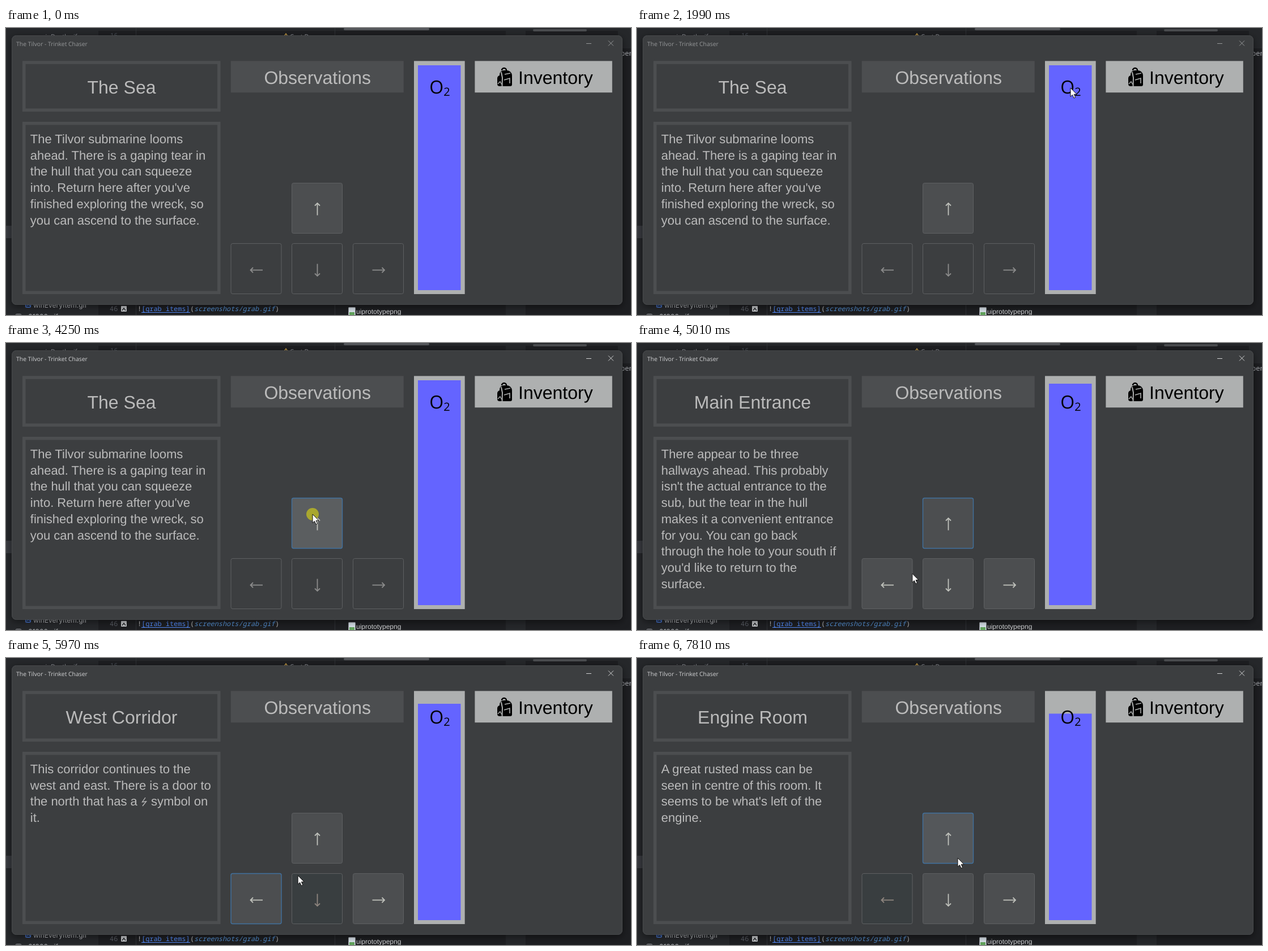
Recreate the animation shown at these times as an HTML page with a canvas. Size 1103 by 508 pixels, loop 8000 ms.

```html
<!DOCTYPE html>
<html lang="en">
<head>
<meta charset="utf-8">
<title>Underwater exploration game</title>
<style>
  html, body { margin: 0; width: 100%; height: 100%; overflow: hidden; background: #1e1f22; }
  canvas { display: block; }
</style>
</head>
<body>
<canvas width="1103" height="508"></canvas>
<script>
const ctx = document.querySelector('canvas').getContext('2d');
ctx.textRendering = 'geometricPrecision';
const LOOP = 8000;
const SANS = '"Liberation Sans", Arial, sans-serif';
const UI = '"Open Sans", sans-serif';
const MONO = '"Noto Sans Mono", monospace';
const PANEL = '#3c3e40', RAISED = '#4c4e50', LIGHT = '#aeb0b0', INK = '#bbbbbb';

const scenes = [
  { at: 0, title: 'The Sea', air: 66, off: 'left down right', lines: [
    'The Tilvor submarine looms', 'ahead. There is a gaping tear in', 'the hull that you can squeeze',
    "into. Return here after you've", 'finished exploring the wreck, so', 'you can ascend to the surface.'] },
  { at: 4410, title: 'Main Entrance', air: 72, off: '', lines: [
    'There appear to be three', 'hallways ahead. This probably', "isn't the actual entrance to the",
    'sub, but the tear in the hull', 'makes it a convenient entrance', 'for you. You can go back',
    'through the hole to your south if', "you'd like to return to the", 'surface.'] },
  { at: 5620, title: 'West Corridor', air: 81, off: 'down', bolt: true, lines: [
    'This corridor continues to the', 'west and east. There is a door to',
    'the north that has a    symbol on', 'it.'] },
  { at: 6670, title: 'Electrical Room', air: 90, off: 'left', lines: [
    'Panels of dead switches line the', 'walls of this room. There are',
    'doors to the north and east.'] },
  { at: 7700, title: 'Engine Room', air: 98.5, off: 'left', lines: [
    'A great rusted mass can be', 'seen in centre of this room. It',
    "seems to be what's left of the", 'engine.'] }
];

const buttons = [
  { name: 'up', x: 504, y: 274, turn: 0 },
  { name: 'left', x: 396.5, y: 381, turn: -1 },
  { name: 'down', x: 504, y: 381, turn: 2 },
  { name: 'right', x: 612, y: 381, turn: 1 }
];

const clicks = [[4060, 4410], [5550, 5700], [7610, 7810]];
const focusChanges = [[4060, 'up'], [5550, 'left'], [6670, 'up']];

// Pointer route: time, x, y
const route = [
  [0, 1070, 508], [70, 1069, 490], [400, 985, 190], [830, 820, 62], [1100, 733, 150],
  [1400, 765, 398], [1650, 855, 304], [1800, 868, 200], [1990, 765, 106], [2330, 765, 106],
  [2580, 560, 4], [2850, 44, 190], [3000, 150, 310], [3170, 92, 150], [3310, 181, 62],
  [3600, 390, 130], [3990, 541, 303], [4600, 541, 303], [5010, 486, 408], [5350, 460, 424],
  [5790, 460, 424], [5970, 515, 385], [6540, 566, 354], [LOOP, 566, 354]
];

function pointerAt(t) {
  const i = Math.max(0, route.findIndex(p => p[0] > t) - 1);
  const a = route[i], b = route[i + 1], span = b[0] - a[0], u = (t - a[0]) / span;
  const still = (p, q) => p[1] === q[1] && p[2] === q[2];
  const slope = (k, axis) => {
    const p = route[k - 1], c = route[k], n = route[k + 1];
    return !p || !n || still(p, c) || still(c, n) ? 0 : (n[axis] - p[axis]) / (n[0] - p[0]);
  };
  const axisAt = axis =>
    (2 * u ** 3 - 3 * u * u + 1) * a[axis] + (3 * u * u - 2 * u ** 3) * b[axis] +
    span * ((u ** 3 - 2 * u * u + u) * slope(i, axis) + (u ** 3 - u * u) * slope(i + 1, axis));
  return { x: axisAt(1), y: axisAt(2) };
}

function rect(x, y, w, h, color) {
  ctx.fillStyle = color;
  ctx.fillRect(x, y, w, h);
}

function rounded(x, y, w, h, r, fill, stroke, width = 1) {
  ctx.beginPath();
  ctx.roundRect(x, y, w, h, r);
  if (fill) { ctx.fillStyle = fill; ctx.fill(); }
  if (stroke) { ctx.strokeStyle = stroke; ctx.lineWidth = width; ctx.stroke(); }
}

function text(str, x, y, font, color, align = 'left') {
  ctx.font = font;
  ctx.fillStyle = color;
  ctx.textAlign = align;
  ctx.fillText(str, x, y);
}

function line(points, color, width = 1) {
  ctx.beginPath();
  points.forEach(([x, y]) => ctx.lineTo(x, y));
  ctx.strokeStyle = color;
  ctx.lineWidth = width;
  ctx.stroke();
}

function frame(x, y, w, h) {
  ctx.strokeStyle = RAISED;
  ctx.lineWidth = 5.5;
  ctx.strokeRect(x + 2.75, y + 2.75, w - 5.5, h - 5.5);
}

function drawEditor() {
  rect(0, 0, 1103, 508, '#1e1f22');
  rect(0, 0, 163, 508, '#26282b');
  rect(0, 350, 12, 22, '#3a3c41');
  rect(882, 0, 35, 508, '#26282b');
  rect(163, 0, 940, 5, '#26282b');
  rect(1080, 5, 23, 31, '#26282b');
  for (const x of [229, 580]) rect(x, 0, 1, 508, '#303236');
  rounded(596, 0, 151, 4, 2, '#55575b');
  rounded(930, 2, 95, 4, 2, '#4b4d50');

  text('winDeath.gif', 61, 19, '11px ' + UI, '#9a9ca1');
  text('16', 184, 17, '11px ' + MONO, '#4b5059');
  text('Cost Down', 501, 19, '11px ' + UI, '#9a9ca1');
  line([[490, 16], [494, 10], [498, 16]], '#c29a45', 1.5);
  text('pen', 1085, 49, '12px ' + MONO, '#a9abb0');

  rounded(34.5, 486.5, 9, 8, 1, '#25324d', '#548af7');
  line([[36, 493], [39, 489], [43, 493]], '#548af7');
  text('winEveryItem.gif', 48, 495, '12px Inter, sans-serif', '#b4b6ba');
  rounded(17.5, 506.5, 9, 8, 1, null, '#a0a2a7');
  text('p21900.gif', 32, 515, '12px Inter, sans-serif', '#b4b6ba');

  const mono = '11.9px ' + MONO;
  text('46', 183, 501, mono, '#5a5e66');
  rounded(203, 492, 10, 10, 1, '#c5c7ca');
  line([[205, 500], [208, 496], [211, 500]], '#26282b', 1.5);
  text('!', 232, 501, mono, INK);
  text('[grab items]', 239, 501, mono, '#548af7');
  rect(239, 503, 86, 1, '#548af7');
  text('(', 325, 501, mono, INK);
  text('screenshots/grab.gif', 332, 501, 'italic ' + mono, '#548fd0');
  text(')', 475, 501, mono, INK);

  rounded(604.5, 494.5, 12, 14, 1, '#d9e2ea', '#909498');
  rect(606, 503, 9, 5, '#62a45c');
  text('uiprototypepng', 618, 506, '12px ' + SANS, '#d2d3d5');
}

function drawBackpack() {
  rounded(871, 75, 22, 28, [8, 9, 3, 3], '#000');
  rounded(867, 84, 9, 19, [5, 2, 2, 4], '#000');
  ctx.beginPath();
  ctx.arc(879, 75, 4, Math.PI, 0);
  ctx.strokeStyle = '#000';
  ctx.lineWidth = 2.5;
  ctx.stroke();
  line([[874, 78], [876, 88], [875.5, 103]], LIGHT, 2);
  line([[879, 92], [889, 89], [889, 98]], LIGHT, 1.6);
  line([[880, 82], [890, 80]], LIGHT, 1.4);
  line([[868, 99], [872, 95], [875, 100]], LIGHT, 1.4);
}

function drawWindow(scene, active) {
  ctx.save();
  ctx.shadowColor = 'rgba(0,0,0,.5)';
  ctx.shadowBlur = 14;
  ctx.shadowOffsetY = 3;
  rounded(10, 13, 1078, 477, 8, PANEL);
  ctx.restore();
  rounded(10.5, 13.5, 1077, 476, 8, null, '#47494b');

  const chrome = active ? '#d2d3d4' : '#969899';
  text('The Tilvor - Trinket Chaser', 18, 31.5, '10.4px ' + UI, chrome);
  line([[1024, 27.5], [1033, 27.5]], chrome);
  line([[1063, 22.5], [1072, 31.5]], chrome);
  line([[1063, 31.5], [1072, 22.5]], chrome);

  const heading = '32px ' + SANS;
  frame(29, 58.3, 349.5, 89.7);
  frame(29, 166, 349.5, 305);
  text(scene.title, 204, 116, heading, INK, 'center');
  ctx.letterSpacing = '-0.03px';
  scene.lines.forEach((row, i) => text(row, 42.8, Math.round(204 + i * 28.7), '22px ' + SANS, INK));
  ctx.letterSpacing = '0px';
  if (scene.bolt) line([[246, 247], [240.5, 255], [247.5, 254], [241, 262]], INK, 1.3);

  rect(396.7, 58.4, 305, 55.8, RAISED);
  text('Observations', 549.7, 99, heading, INK, 'center');

  rect(720, 58.4, 89.7, 412.6, LIGHT);
  rect(727, scene.air, 75.5, 464 - scene.air, '#6464ff');
  text('O', 759.7, 115.5, '32px ' + UI, '#000', 'center');
  text('2', 778, 119.5, '20px ' + UI, '#000', 'center');

  rect(827.4, 58.4, 242.4, 55.8, LIGHT);
  drawBackpack();
  text('Inventory', 904, 99, heading, '#000');
}

function drawButton(b, scene, pointer, focus, pressed) {
  const enabled = !scene.off.includes(b.name);
  const over = pointer.x >= b.x && pointer.x < b.x + 87 && pointer.y >= b.y && pointer.y < b.y + 90;
  const muted = over || (b.name === 'left' && scene.at >= 6670);
  const fill = enabled ? (over ? (pressed ? '#5b5e60' : '#54575a') : RAISED) : (muted ? '#393e40' : PANEL);
  const focused = focus === b.name;
  rounded(b.x + .5, b.y + .5, 89, 89, 3, fill, focused ? '#40719f' : '#5e6062', focused ? 1.4 : 1);

  ctx.save();
  ctx.translate(b.x + 45.5, b.y + (b.name === 'up' ? 46.5 : 47.5));
  ctx.rotate(b.turn * Math.PI / 2);
  const color = enabled ? '#c0c2bc' : (muted ? '#8f867f' : '#8c8c8c');
  line([[0, 11], [0, -10.5]], color, 1.8);
  line([[-4.5, -6], [0, -10.5], [4.5, -6]], color, 1.8);
  ctx.restore();
}

function drawPointer({ x, y }, pressed) {
  if (pressed) {
    ctx.beginPath();
    ctx.arc(x, y, 11, 0, 7);
    ctx.fillStyle = 'rgba(180,178,40,.88)';
    ctx.fill();
  }
  ctx.beginPath();
  [[0, 0], [0, 15.5], [3.5, 12.3], [6, 18], [8.6, 16.9], [6.2, 11.3], [11, 11.3]]
    .forEach(([dx, dy]) => ctx.lineTo(x + dx, y + dy));
  ctx.closePath();
  ctx.fillStyle = '#fff';
  ctx.fill();
  ctx.strokeStyle = '#111';
  ctx.lineWidth = 1;
  ctx.stroke();
}

function draw(now) {
  const t = now % LOOP;
  const scene = scenes.findLast(s => t >= s.at);
  const focus = focusChanges.findLast(([at]) => t >= at)?.[1];
  const pressed = clicks.some(([from, to]) => t >= from && t < to);
  const pointer = pointerAt(t);

  drawEditor();
  drawWindow(scene, t >= 4060);
  buttons.forEach(b => drawButton(b, scene, pointer, focus, pressed));
  if (t >= 70) drawPointer(pointer, pressed);
  requestAnimationFrame(() => draw(performance.now()));
}
draw(performance.now());
</script>
</body>
</html>
```
